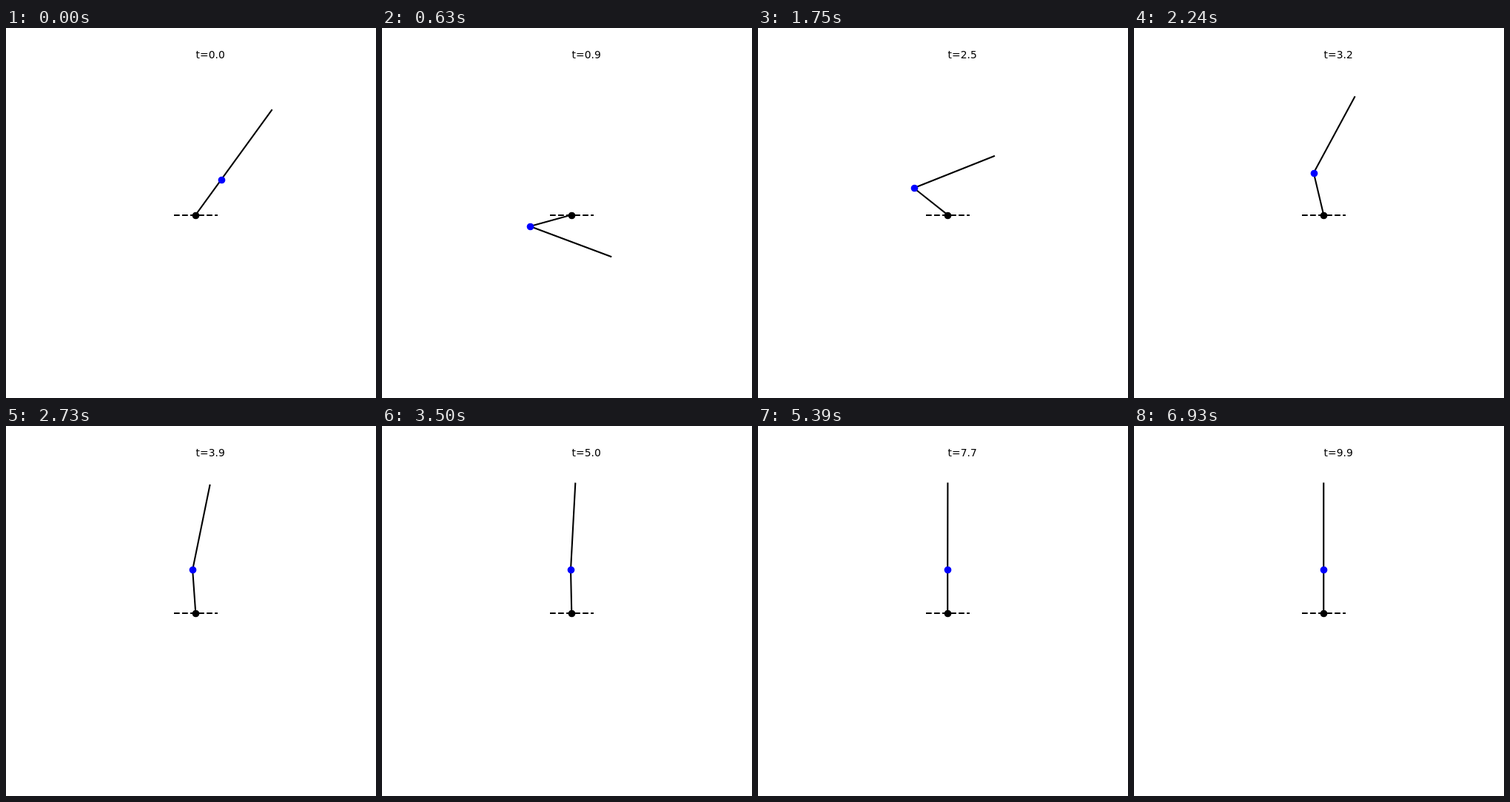
Recreate the animation shown at these times as an HTML page with a canvas. Size 500x500 px, loop 7 s.

```html
<!DOCTYPE html>
<html lang="en">
<head>
<meta charset="utf-8">
<title>Two-link arm balancing</title>
<style>
  html, body { margin: 0; width: 100%; height: 100%; overflow: hidden; background: #fff; }
  canvas { display: block; width: 500px; height: 500px; }
</style>
</head>
<body>
<canvas id="stage" width="500" height="500"></canvas>
<script>
const ctx = document.getElementById('stage').getContext('2d');
const STEP = 70, STEPS = 100;
const PIVOT = { x: 256.25, y: 252.5 };
const UNIT = 385 / 6.6;
const LINE = 25 / 12;

// Smooth drop from size to zero around the time mid
const settle = (t, size, rate, mid) => size / (1 + Math.exp(rate * (t - mid)));
// Transient that starts at size and dies out
const fade = (t, size, span, power) => size * Math.exp(-((t / span) ** power));

// Tilts from upright in degrees: a quick fold, then a slow return to balance.
// The lower link tilts left, the upper link right.
const lowerTilt = t =>
  settle(t, 102.4, 3, 2.455) + settle(t, 4, 1.5, 4.4) - fade(t, 142.3, 0.18, 1.4);
const upperTilt = t =>
  settle(t, 90, 2.7, 2.52) + settle(t, 30, 1.3, 3.3)
  - fade(t, 53.5, 0.12, 1.7) - fade(t, 30, 0.75, 2);

function along(from, tilt, length) {
  const a = tilt * Math.PI / 180;
  return {
    x: from.x + length * UNIT * Math.sin(a),
    y: from.y - length * UNIT * Math.cos(a)
  };
}

// Dots sit on whole pixels
function dot(p, color) {
  ctx.fillStyle = color;
  ctx.beginPath();
  ctx.arc(Math.round(p.x) + 0.5, Math.round(p.y) + 0.5, 4.86, 0, 2 * Math.PI);
  ctx.fill();
}

function stroke(points, cap, dash) {
  ctx.lineCap = cap;
  ctx.setLineDash(dash);
  ctx.beginPath();
  points.forEach(p => ctx.lineTo(p.x, p.y));
  ctx.stroke();
}

function draw(t) {
  const elbow = along(PIVOT, -lowerTilt(t), 1);
  const tip = along(elbow, upperTilt(t), 2);
  ctx.fillStyle = '#fff';
  ctx.fillRect(0, 0, 500, 500);
  ctx.strokeStyle = '#000';
  ctx.lineWidth = LINE;
  ctx.lineJoin = 'round';
  stroke([PIVOT, elbow, tip], 'square', []);
  stroke([{ x: 227, y: 253 }, { x: 286, y: 253 }], 'butt', [3.7 * LINE, 1.6 * LINE]);
  dot(PIVOT, '#000');
  dot(elbow, '#00f');
  ctx.fillStyle = '#000';
  ctx.font = '13.89px "DejaVu Sans", sans-serif';
  ctx.fillText('t=' + t.toFixed(1), 256.6, 41);
}

const start = performance.now();
function tick() {
  const step = Math.floor((performance.now() - start) / STEP) % STEPS;
  draw(step / 10);
  requestAnimationFrame(tick);
}
tick();
</script>
</body>
</html>
```
